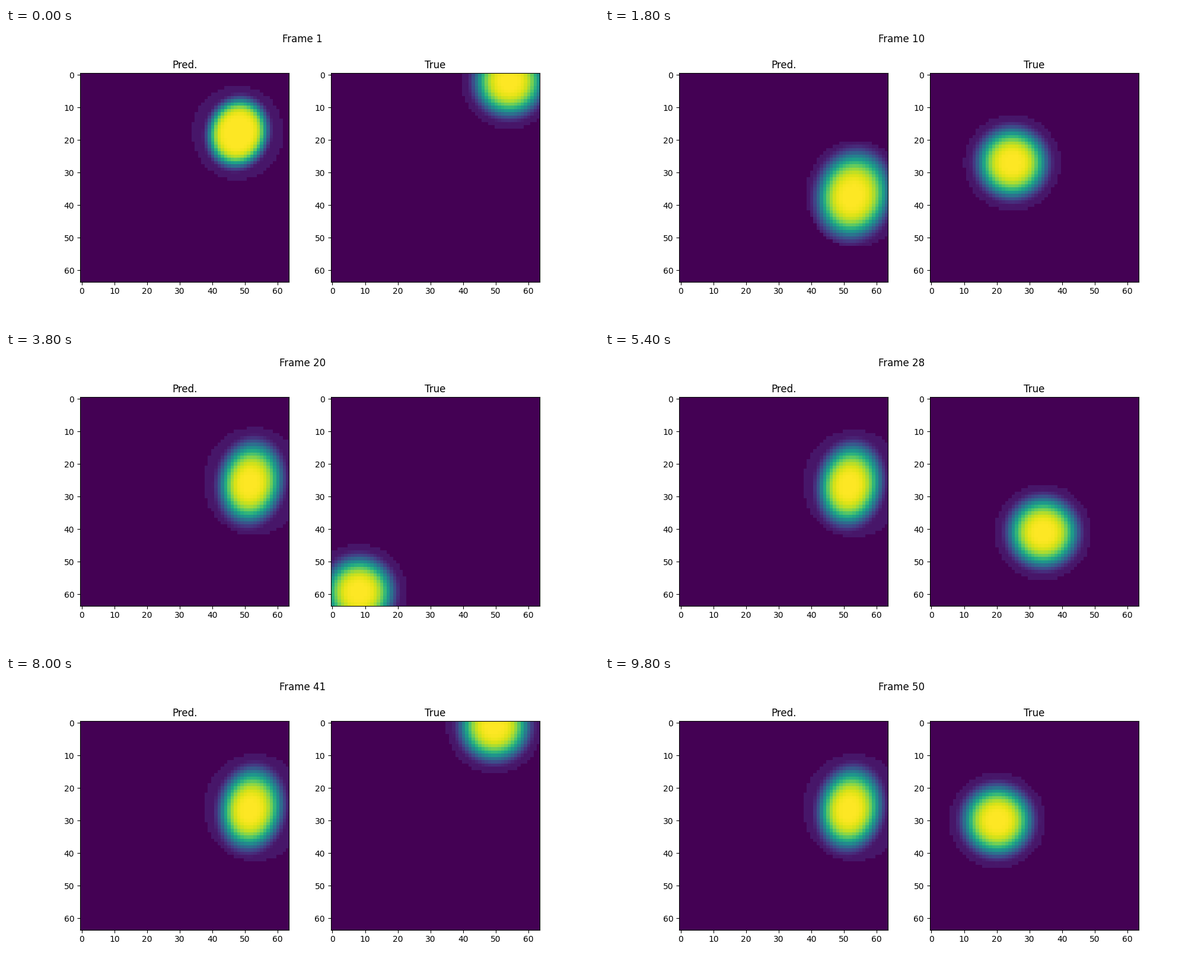
A matplotlib script that plays this animation: 1000x500 px, repeating every 10000 ms.

```python
import numpy as np
import matplotlib.pyplot as plt
from matplotlib.animation import FuncAnimation

SIZE = 64
FRAMES = 50
INTERVAL = 200
WALL = SIZE - 1
RADIUS = 10.1
HALO = 0.06
HALO_RADIUS = 14.7
TILT = 0.07

# The predicted ball drops, climbs back and comes to rest
TIMES = [0, 6, 10, 19, 27]
X_PATH = [47.7, 51.5, 53.2, 51.7, 51.8]
Y_PATH = [17.8, 33.8, 37.8, 25.6, 26.3]
WIDTHS = [8, 10, 10.6, 9.1, 9.1]
HEIGHTS = [9.1, 11.6, 12.5, 11.6, 11.6]

plt.rcParams["font.family"] = "DejaVu Sans"

rows, cols = np.mgrid[0:SIZE, 0:SIZE].astype(float)


def bounce(path):
    """Fold a straight path between the two walls."""
    return abs((path + WALL) % (2 * WALL) - WALL)


def reach(cx, cy, rx, ry, tilt=0.0):
    """Elliptic distance of every cell, 1 on the outline."""
    dy = rows - cy
    dx = cols - cx + tilt * dy
    return np.hypot(dx / rx, dy / ry)


def shade(rho, in_halo, gain=1.0):
    """Soft-edged ball on a flat halo; more gain flattens its top."""
    body = 1 - (1 - np.exp(-rho ** 4)) ** gain
    return np.where(in_halo, np.maximum(body, HALO), 0)


def true_ball(i):
    dist = reach(bounce(3.263 * i - 54), bounce(3.224 * i - 2), 1, 1)
    return shade(dist / RADIUS, dist < HALO_RADIUS)


def pred_ball(i):
    cx, cy, rx, ry = (np.interp(i, TIMES, path)
                      for path in (X_PATH, Y_PATH, WIDTHS, HEIGHTS))
    settle = 1 - np.exp(-i / 3)
    # The peak sits off centre, the outline does not
    inner = settle * np.clip(1 - reach(cx, cy, rx, ry, TILT), 0, 1)
    rho = reach(cx - 0.5 * inner, cy + 0.6 * inner, rx, ry, TILT)
    halo = reach(cx + settle, cy - 0.3 * settle,
                 14 + 1.5 * settle, 14.5 + 2 * settle)
    return shade(rho, halo < 1, gain=2 - settle)


fig, axes = plt.subplots(1, 2, figsize=(10, 5), dpi=100)
heading = fig.suptitle("Frame 1")
balls = (pred_ball, true_ball)
images = []
for ax, name, ball in zip(axes, ("Pred.", "True"), balls):
    ax.set_title(name)
    images.append(ax.imshow(ball(0), cmap="viridis", vmin=0, vmax=1))


def update(i):
    heading.set_text(f"Frame {i + 1}")
    for image, ball in zip(images, balls):
        image.set_data(ball(i))
    return [heading, *images]


anim = FuncAnimation(fig, update, frames=FRAMES, interval=INTERVAL,
                     repeat=True, repeat_delay=0, blit=False)
plt.show()
```
